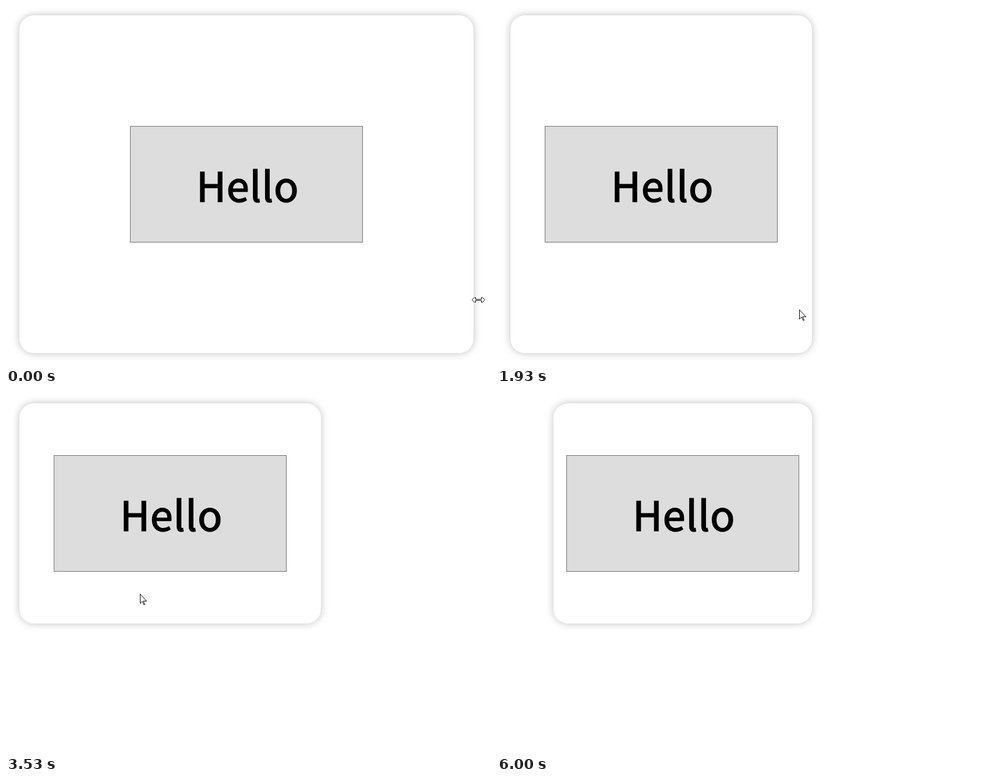
These frames come from a looping animation (833x618 px, 6.79 s). An HTML page:

```html
<!DOCTYPE html>
<html lang="en">
<head>
<meta charset="utf-8">
<title>Resizable card</title>
<style>
  html, body { margin: 0; width: 100%; height: 100%; overflow: hidden; background: #fff; }
  svg { position: absolute; left: 0; top: 0; display: block; }
  #card {
    position: absolute; background: #fff;
    border-radius: 25px; box-shadow: 0 0 14px rgba(0, 0, 0, .25);
  }
  text {
    font: 500 70px "Noto Sans CJK JP", "Noto Sans CJK SC", "Noto Sans CJK", sans-serif;
    letter-spacing: .9px; stroke: #000; stroke-width: 1.6px;
  }
</style>
</head>
<body>
<div id="card"></div>
<svg width="833" height="618" viewBox="0 0 833 618">
  <g id="box">
    <rect x=".5" y=".5" width="399" height="199" fill="#ddd" stroke="#707070"/>
    <text x="114" y="130.3">Hello</text>
  </g>
  <g id="cursor" fill="#fff" stroke="#000">
    <path id="ew" d="M-10.5 .5l4-4h2v3h10v-3h2l4 4l-4 4h-2v-3h-10v3h-2z"/>
    <path id="ns" d="M.5 -10.5l-4 4v2h3v10h-3v2l4 4l4-4v-2h-3v-10h3v-2z"/>
    <path id="arrow" d="M.5 .5v16l3.5-3.5l2.5 5.5h2l-2.5-6h5.5z"/>
  </g>
</svg>
<script>
const LOOP = 6790, TICK = 200 / 3, TOP = 16;
const $ = id => document.getElementById(id);
const card = $("card"), box = $("box"), cursor = $("cursor");

const sine = p => (1 - Math.cos(Math.PI * p)) / 2;
const out = n => p => 1 - (1 - p) ** n;
const rise = p => p ** 1.4;

// Distance covered so far by one move of the given length.
const glide = (t, from, to, length, ease = sine) =>
  length * ease(Math.min(1, Math.max(0, (t - from) / (to - from))));

// Edges of the card
const right = t => 803 + glide(t, 922, 1665, -262);
const bottom = t => 596 + glide(t, 2600, 3330, -202, out(1.867));
const left = t => 23 + glide(t, 4400, 4950, 74);

// The pointer runs slightly ahead of the edge it drags.
const pointerX = t => right(t + 30) + 8
  + glide(t, 1800, 2133, -86)
  + glide(t, 2600, 3330, -53, rise)
  + glide(t, 3400, 4000, -394, out(2.43))
  + glide(t, 4130, 4200, -1)
  + left(t) - 23
  + glide(t, 5400, 6000, 59, rise);

const pointerY = t => 504
  + glide(t, 0, 133, 8)
  + glide(t, 333, 466, -14)
  + glide(t, 922, 1665, -20, out(1.8))
  + glide(t, 1800, 2133, 125)
  + bottom(t + TICK) - 596
  + glide(t, 3400, 4000, -127, out(2.43))
  + glide(t, 4400, 4866, -5)
  + glide(t, 5400, 6000, 352, rise);

function pointerShape(t) {
  if (t < 1860) return "ew";
  if (t > 2130 && t < 3460) return "ns";
  if (t > 3990 && t < 5460) return "ew";
  return "arrow";
}

const move = (el, x, y) =>
  el.setAttribute("transform", `translate(${Math.round(x)} ${Math.round(y)})`);

function draw(time) {
  const t = Math.floor((time % LOOP + 3.4) / TICK) * TICK;
  const l = Math.round(left(t)), r = Math.round(right(t)), b = Math.round(bottom(t));
  Object.assign(card.style, {
    left: l + "px", top: TOP + "px", width: r - l + "px", height: b - TOP + "px",
    // The lower shadow is cut short while the bottom edge moves.
    clipPath: t > 2660 && t < 3260 ? "inset(-20px -20px -5px)" : "none"
  });
  move(box, (l + r) / 2 - 200, (TOP + b) / 2 - 100);
  move(cursor, pointerX(t), pointerY(t));
  const shape = pointerShape(t);
  for (const c of cursor.children) c.style.display = c.id === shape ? "" : "none";
}

const start = performance.now();
function loop() {
  draw(performance.now() - start);
  requestAnimationFrame(loop);
}
loop();
</script>
</body>
</html>
```
